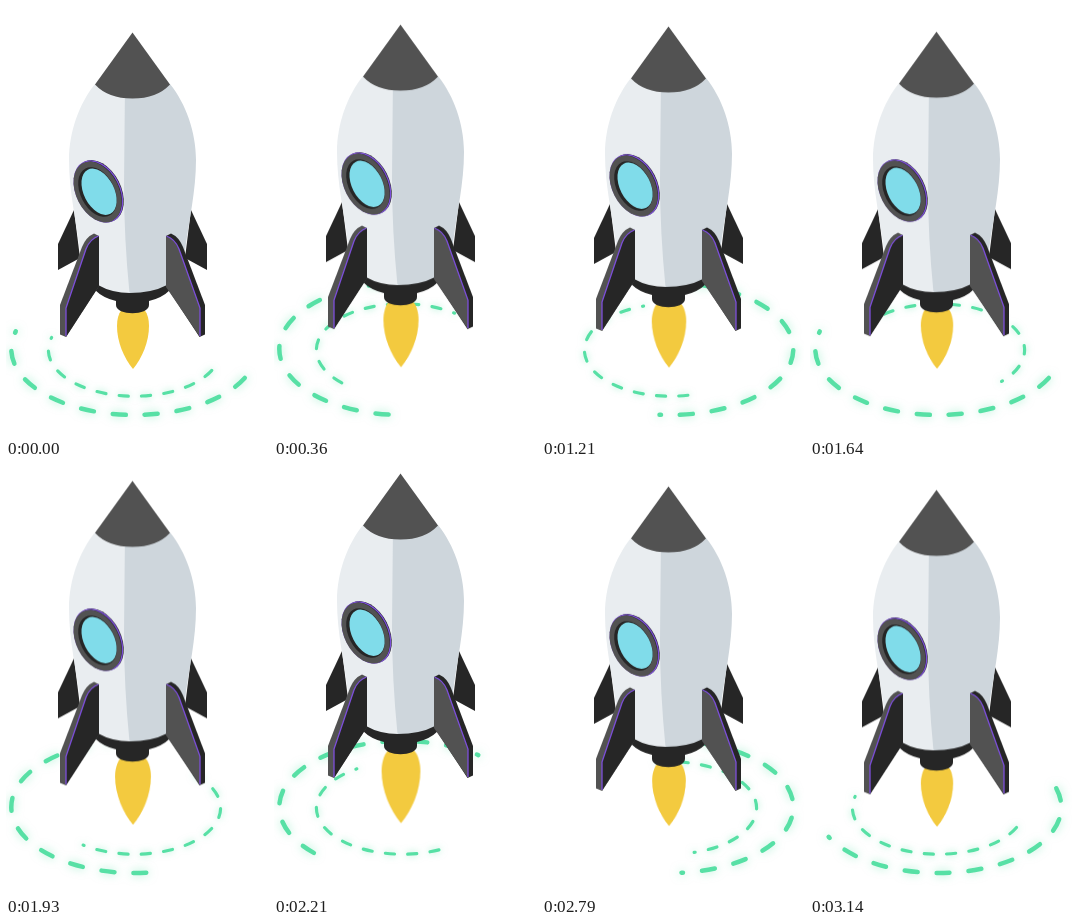
An HTML page without scripts that plays this animation: 262 px wide and 430 px high, repeating every 3210 ms.

```html
<!DOCTYPE html>
<html lang="en">
<head>
<meta charset="utf-8">
<title>Rocket</title>
<style>
  html, body { margin: 0; width: 100%; height: 100%; overflow: hidden; background: #fff; }
  svg { display: block; width: 262px; height: 430px; }

  .ring {
    fill: none;
    stroke: #57e0a5;
    stroke-width: 4.5;
    stroke-linecap: round;
    /* nine full dashes, a short one, then the open half */
    stroke-dasharray: 13 19 13 19 13 19 13 19 13 19 13 19 13 19 13 19 13 19 1.5 317.5;
    stroke-dashoffset: -32;
    filter: drop-shadow(0 0 5px rgba(87, 224, 165, .5));
    animation: spin 3210ms linear infinite;
  }
  .outer { --end: -1220; }
  .inner { --end: -1892; }
  @keyframes spin { to { stroke-dashoffset: var(--end); } }

  .rocket { animation: bob 3210ms ease-in-out infinite; }
  @keyframes bob {
    0%, 47.5% { transform: translateY(0); }
    23.75%, 71.25% { transform: translateY(-17.4px); }
    95% { transform: translateY(0); animation-timing-function: ease-in; }
    100% { transform: translateY(-1.7px); }
  }

  .flame {
    fill: #f3ca3f;
    transform-origin: 127px 300px;
    animation: burn 3210ms ease-in-out infinite;
  }
  @keyframes burn {
    0%, 47.5% { transform: scale(1); }
    23.75%, 71.25% { transform: scale(1.215); }
    95% { transform: scale(1); animation-timing-function: ease-in; }
    100% { transform: scale(1.02); }
  }

  .dark { fill: #262626; }
  .grey { fill: #525252; }
  .trim { fill: none; stroke: #7d4fdb; stroke-width: 1.3; }
</style>
</head>
<body>
<svg viewBox="0 0 262 430">
  <g transform="translate(128.3 343)">
    <ellipse class="ring outer" rx="123" ry="66" pathLength="607"/>
  </g>
  <g transform="translate(128.5 344) scale(.7)">
    <ellipse class="ring inner" rx="123" ry="66" pathLength="607"/>
  </g>

  <g class="rocket">
    <path class="flame" d="M127 363C118 352 111 336 111 320C111 307 117 298 127 298S143 307 143 320C143 336 136 352 127 363Z"/>

    <!-- rear fins -->
    <path class="dark" d="M68 204L52 238V264L74 252Z"/>
    <path class="dark" d="M185 204L201 238V264L179 252Z"/>

    <!-- skirt and nozzle -->
    <path class="dark" d="M89 276V284Q97 292 110 295V299C110 310 143 310 143 299V295Q156 292 164 284V276Z"/>

    <!-- hull -->
    <path fill="#e9edf0" d="M89 78C73 98 63 126 63 154C63 185 70 214 74 245L92 279Q106 287 124 287V78Z"/>
    <path fill="#ced6dc" d="M164 78C180 98 190 126 190 154C190 185 183 214 179 245L161 279Q146 287 123.500 287Q118 232 118 180L119 78Z"/>
    <path class="grey" d="M126.500 26.500L164 78.500Q151 92.500 126.500 92.500T89 78.500Z"/>

    <!-- front fins -->
    <path class="grey" d="M93 230L88 227.500Q80 231 76 241L54 299V328.500L60 331L93 280Z"/>
    <path class="dark" d="M93 230Q84 233 80 243L60 302V331L93 280Z"/>
    <path class="trim" d="M92.500 230Q84 233 80 243L60 302V330"/>

    <path class="dark" d="M160 230L165 227.500Q173 231 177 241L199 299V328.500L193.500 331L160 280Z"/>
    <path class="grey" d="M160 230Q169 233 173 243L194 302V331L160 281Z"/>
    <path class="trim" d="M160.500 230Q169 233 173 243L194 302V330"/>

    <!-- window -->
    <g transform="translate(91.500 186) rotate(-27)">
      <ellipse class="dark" cx="2" cy="0" rx="21.800" ry="33"/>
      <ellipse class="trim" cx="1" cy="0" rx="21.500" ry="32.500"/>
      <ellipse class="grey" rx="21.300" ry="32.500"/>
      <ellipse class="dark" rx="17" ry="26.500"/>
      <ellipse fill="#80dcea" cx="1.500" cy=".5" rx="15.200" ry="24.800"/>
    </g>
  </g>
</svg>
</body>
</html>
```
